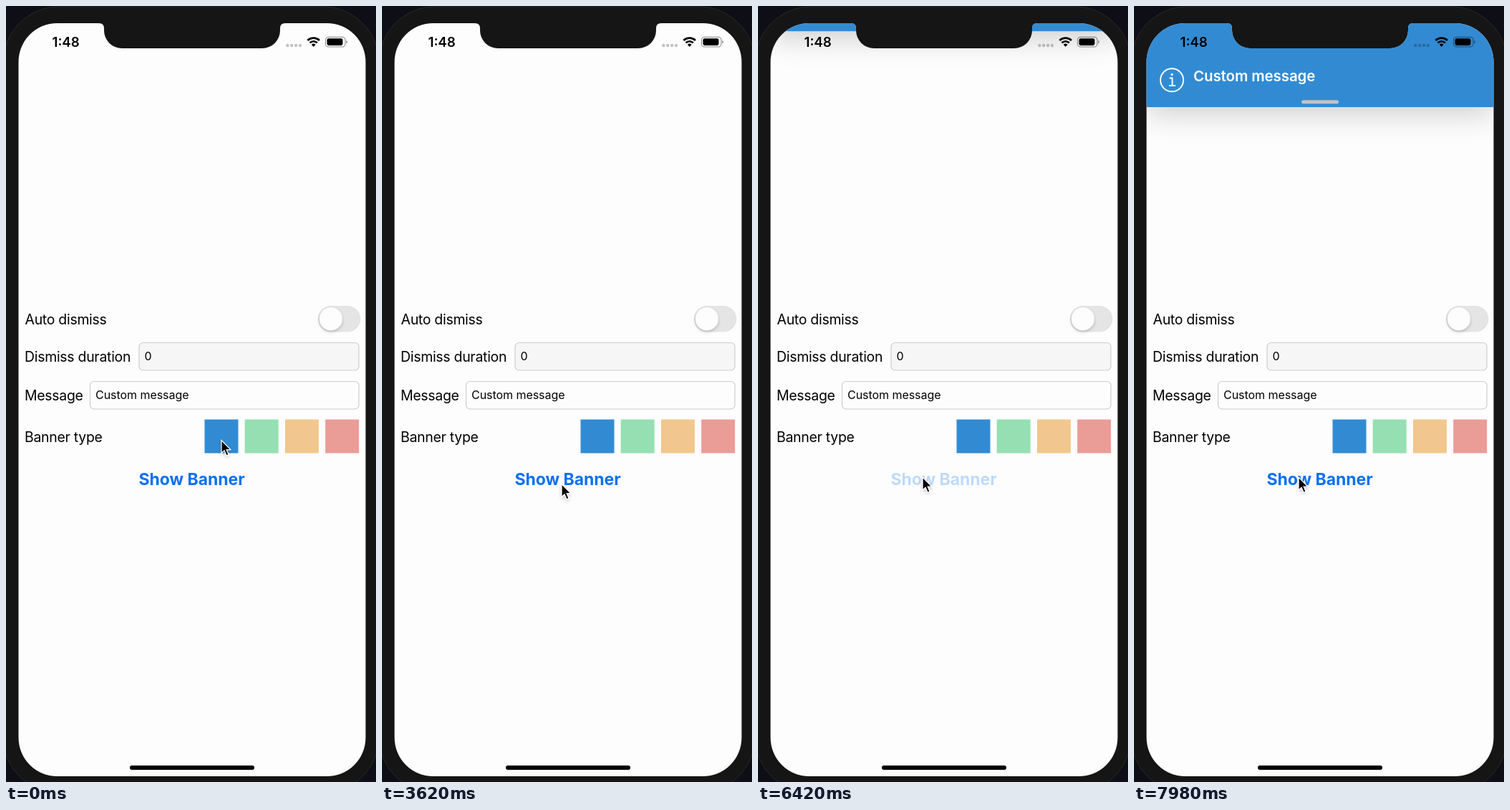
An HTML page for the animation above (8 s loop, 517 by 1082 pixels).

```html
<!DOCTYPE html>
<html lang="en">
<head>
<meta charset="utf-8">
<title>Banner demo</title>
<style>
  html, body { margin: 0; height: 100%; overflow: hidden; background: #0e0e16; }
  svg { display: block; width: 100vw; height: 100vh; }
  text { font-family: Inter, Roboto, sans-serif; white-space: pre; }
  .label { font-size: 19.4px; letter-spacing: -.25px; }
  .field { font-size: 16px; letter-spacing: -.05px; }
  .box { stroke: #cdcfca; stroke-width: 1.2; }
</style>
</head>
<body>
<svg viewBox="0 0 517 1082" preserveAspectRatio="none">
  <defs>
    <path id="screen" d="M71.5 24H130Q137 24 137 31V34A25 25 0 0 0 162 59H358A25 25 0 0 0 383 34V31Q383 24 390 24H448.5A54 54 0 0 1 502.5 78V1020A54 54 0 0 1 448.5 1074H71.5A54 54 0 0 1 17.5 1020V78A54 54 0 0 1 71.5 24Z"/>
    <clipPath id="clip"><use href="#screen"/></clipPath>
    <filter id="blur" filterUnits="userSpaceOnUse" x="-80" y="-80" width="680" height="340"><feGaussianBlur stdDeviation="22"/></filter>
    <filter id="soft" x="-50%" y="-50%" width="200%" height="200%"><feDropShadow dx="0" dy="2" stdDeviation="2" flood-opacity=".22"/></filter>
  </defs>

  <!-- phone body and screen -->
  <rect x="-4" y="1" width="525" height="1096" rx="78" fill="#151515" stroke="#28282a"/>
  <use href="#screen" fill="#fdfdfd"/>

  <!-- form -->
  <g class="label">
    <text x="26.5" y="443.5">Auto dismiss</text>
    <text x="26" y="496">Dismiss duration</text>
    <text x="26" y="550">Message</text>
    <text x="26" y="607.5">Banner type</text>
  </g>
  <rect x="435.8" y="418" width="59.6" height="36.6" rx="18.3" fill="#e5e5e6"/>
  <circle cx="454" cy="436.3" r="16" fill="#fdfdfd" filter="url(#soft)"/>
  <rect class="box" x="186" y="469.5" width="307" height="38.5" rx="5.5" fill="#f6f6f6"/>
  <rect class="box" x="117.5" y="523.5" width="375.5" height="38.5" rx="5.5" fill="#fdfdfd"/>
  <g class="field">
    <text x="193.5" y="494">0</text>
    <text x="125" y="548">Custom message</text>
  </g>
  <rect x="277.5" y="576.5" width="47" height="47" fill="#328bd2"/>
  <rect x="333.7" y="576.5" width="47" height="47" fill="#96dfb2"/>
  <rect x="390" y="576.5" width="47" height="47" fill="#f1c78f"/>
  <rect x="446.2" y="576.5" width="47" height="47" fill="#ea9c97"/>
  <text id="button" x="259.5" y="668" text-anchor="middle" font-size="23" font-weight="700" letter-spacing="-.05" fill="#0670f6">Show Banner</text>

  <!-- banner -->
  <g clip-path="url(#clip)">
    <g id="banner">
      <rect x="17.5" y="32" width="485" height="117" opacity=".2" filter="url(#blur)"/>
      <rect x="17" y="24" width="486" height="117" fill="#328bd2"/>
      <g fill="none" stroke="#fff" stroke-width="1.9">
        <circle cx="53" cy="103.3" r="16"/>
        <path d="M49.5 100.5H53.5V111M49 111H58"/>
      </g>
      <circle cx="53" cy="95.5" r="1.7" fill="#fff"/>
      <text x="83" y="105" font-size="20.4" font-weight="600" letter-spacing="-.05" fill="#fff">Custom message</text>
      <rect x="234" y="131.2" width="52" height="5" rx="2.5" fill="#bfc3c8"/>
    </g>
  </g>

  <!-- status bar and home indicator -->
  <text x="64.5" y="56.7" font-size="18.7" font-weight="600">1:48</text>
  <g fill-opacity=".23">
    <circle cx="393.3" cy="55" r="2.2"/><circle cx="399.2" cy="55" r="2.2"/>
    <circle cx="405.1" cy="55" r="2.2"/><circle cx="411" cy="55" r="2.2"/>
  </g>
  <path d="M421.4 48A12 12 0 0 1 438 48M424.5 51.4A7.4 7.4 0 0 1 434.9 51.4" fill="none" stroke="#000" stroke-width="2.7"/>
  <path d="M429.7 57L426.8 53.8A4 4 0 0 1 432.6 53.8Z"/>
  <rect x="446.5" y="43.3" width="27.5" height="13.6" rx="4" fill="none" stroke="#000" stroke-opacity=".4" stroke-width="1.2"/>
  <rect x="448.5" y="45.2" width="22" height="9.8" rx="2.4"/>
  <path d="M475.4 47.7A2.6 2.6 0 0 1 475.4 52.5Z" fill-opacity=".45"/>
  <rect x="173" y="1059" width="174" height="6" rx="3"/>

  <path id="cursor" d="M0 0V18L4 14.3L7 21.3L10 20L7.1 13.2H12.8Z" stroke="#fff" stroke-width="1.2" filter="url(#soft)"/>
</svg>
<script>
const LOOP = 8000;
const PRESS = 6160, RELEASE = 6318;
const SLIDE = 6294, HEIGHT = 117;
// time, x, y of the cursor tip
const path = [[950, 301, 605.5], [1100, 300, 628], [1450, 251, 666.5], [5850, 251, 666.5], [6080, 230, 657]];
const [cursor, banner, button] = ["cursor", "banner", "button"].map(id => document.getElementById(id));

const ease = (t, start, length) => {
  const x = Math.min(1, Math.max(0, (t - start) / length));
  return x * x * (3 - 2 * x);
};

function cursorAt(t) {
  let [, x, y] = path[0];
  for (let i = 1; i < path.length; i++) {
    const [t0, x0, y0] = path[i - 1], [t1, x1, y1] = path[i];
    const k = ease(t, t0, t1 - t0);
    x += (x1 - x0) * k;
    y += (y1 - y0) * k;
  }
  return `translate(${x} ${y})`;
}

function draw(t) {
  cursor.setAttribute("transform", cursorAt(t));
  banner.setAttribute("transform", `translate(0 ${HEIGHT * (ease(t, SLIDE, 665) - 1)})`);
  banner.style.display = t < SLIDE ? "none" : "";
  button.style.opacity = t < PRESS ? 1 : 0.2 + 0.8 * ease(t, RELEASE, 685);
}

const begin = performance.now();
function tick() {
  draw((performance.now() - begin) % LOOP);
  requestAnimationFrame(tick);
}
tick();
</script>
</body>
</html>
```
